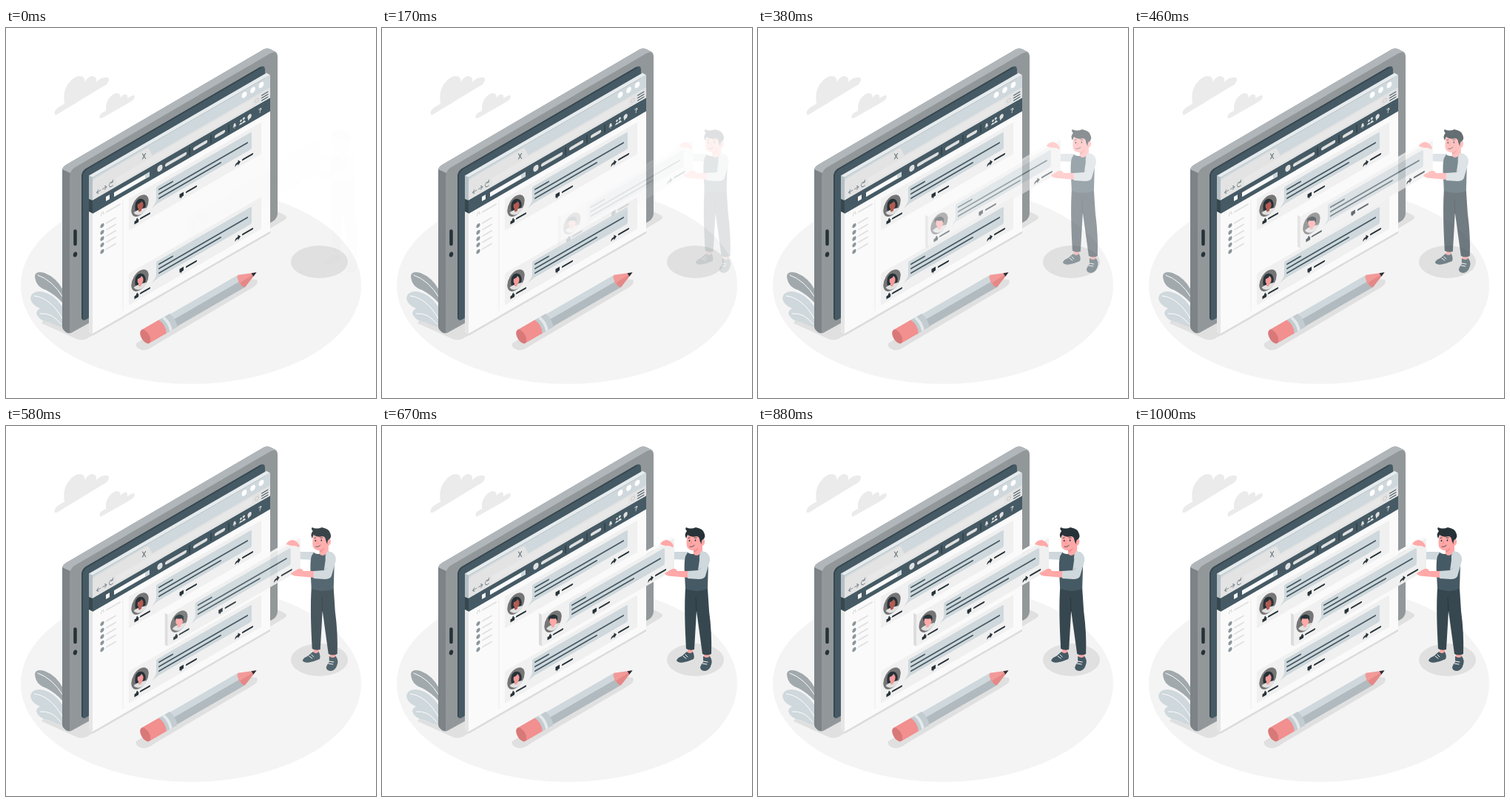
Write an HTML page that moves like this. It is 500 by 500 pixels and loops after 1040 ms.

```html
<!DOCTYPE html>
<html lang="en">
<head>
<meta charset="utf-8">
<title>Placing a post</title>
<style>
html, body { margin: 0; width: 100%; height: 100%; overflow: hidden; background: #fff; }
svg { display: block; width: 100%; height: 100%; }
.line { fill: none; stroke-linecap: round; stroke-linejoin: round; }
</style>
</head>
<body>
<svg viewBox="0 0 500 500">
  <defs>
    <!-- drawn flat, then skewed onto the screen plane -->
    <g id="post">
      <rect x="49" y="59" width="179" height="43" rx="1.500" fill="#f0f0f0"/>
      <path d="M88 64.500H213Q215 64.500 215 66.500V85.500Q215 87.500 213 87.500H88L80 90Q86 86 86 82V66.500Q86 64.500 88 64.500Z" fill="#cfd8dc"/>
      <path class="line" d="M90 70H108M90 76H209M90 82H173" stroke="#455a64" stroke-width="2"/>
      <path class="line" d="M65 95H77M127 95H140M203 95H216" stroke="#263238" stroke-width="2.200"/>
      <g fill="#263238">
        <path d="M56.500 94H58.500L60 91.500Q61.500 91.500 61 94H62.500L62 98H56.500Z"/>
        <path d="M117.500 92.500H123V97.500H121L119 99.500V97.500H117.500Z"/>
        <path d="M192.500 99Q192 94.500 196.500 94.500V92L200 96L196.500 99.500V97Q194 97 192.500 99Z"/>
      </g>
      <ellipse cx="64" cy="77" rx="11.700" ry="13.200" fill="#757575"/>
    </g>
    <!-- portraits, centred on their circle -->
    <g id="woman">
      <path d="M-6 8Q-8 -2 -4 -7Q0 -11 5 -8Q9 -4 7 3L5 8Z" fill="#263238"/>
      <path d="M-8.500 10Q-5 6 -1 6Q5 3 9 3Q8 8 2 11.500Q-4 14.500 -8.500 10Z" fill="#e0e0e0"/>
      <path d="M-3 -2Q1 -3 2 -6Q5 -4 4.500 0Q4 4 2 4.500V7Q0 9 -2 8V4Q-4 3 -3 -2Z" fill="currentColor"/>
    </g>
    <g id="guy">
      <path d="M-9 10Q-5 5 0 5Q6 2 9.500 2Q8 8 2 11.500Q-4 14.500 -9 10Z" fill="#e0e0e0"/>
      <path d="M-4.500 -3Q0 -6 4.500 -4L5.500 -1Q5 4 2 5V7Q0 9 -2 7.500V5Q-5 3 -4.500 -3Z" fill="#ffa8a7"/>
      <path d="M-5 0Q-8 -6 -3 -8Q2 -11 6 -7Q7 -4 5.500 0L4 -4Q0 -3 -4 -4Z" fill="#263238"/>
    </g>
  </defs>

  <!-- floor and clouds -->
  <ellipse cx="250" cy="348" rx="230" ry="133" fill="#f4f4f4"/>
  <ellipse cx="423.500" cy="316" rx="38.500" ry="22" fill="#e0e0e0"/>
  <g fill="#ebebeb">
    <path d="M66 117Q64 112 71 107Q77 104 79 102Q76 84 86 73Q95 62 104 66Q107 69 107 73Q111 64 118 65Q123 67 122 73Q128 67 133 67Q140 66 139 71Q138 76 131 79L72 115Q68 118 66 117Z"/>
    <path d="M127 122Q125 117 131 114L135 112Q134 99 142 92Q149 86 153 89Q155 91 155 94Q159 88 163 90Q165 92 164 95Q174 88 174 93Q173 97 168 100L131 121Q128 123 127 122Z"/>
  </g>
  <path d="M48 399Q50 393 62 391L76 384L358 244L377 253Q381 256 377 259L109 420Q102 423 95 420Z" fill="#e0e0e0"/>

  <!-- plant -->
  <path d="M39 335Q40 328 52 331Q68 337 77 354V372Q66 360 54 354Q40 350 39 335Z" fill="#a1a9ad"/>
  <path d="M33 365Q34 356 46 356Q64 358 77 378V404Q66 402 58 397Q44 396 41 385Q42 381 46 379Q34 374 33 365Z" fill="#cfd8dc"/>
  <path class="line" d="M43 334Q63 341 77 364M38 362Q60 364 77 394M46 386Q62 384 74 400" stroke="#fff" stroke-width="1"/>

  <!-- tablet -->
  <path d="M76 193Q76 188 81 185L348 29Q353 26 358 29L364 32Q367 34 367 39V250Q367 257 361 261L90 411Q85 414 81 411L79 409Q76 407 76 402Z" fill="#92979a"/>
  <path d="M76 191L87 196Q86 198 86 201V412Q83 412 81 411L79 409Q76 407 76 402Z" fill="#7d8386"/>
  <path d="M76 191Q77 187 81 185L348 29Q353 26 358 29L365 33Q361 32 356 35L92 189Q89 191 87 196Z" fill="#b0b6b9"/>
  <path d="M102 202Q102 194 108 190L343 53Q350 49 350 57V250L108 394Q102 397 102 390Z" fill="#455a64"/>
  <path class="line" d="M103 392V201Q103 195 108 191L344 53.500" stroke="#37474f" stroke-width="2"/>
  <path class="line" d="M93.500 274.500V292" stroke="#263238" stroke-width="4.500"/>
  <ellipse cx="93.500" cy="306" rx="2.600" ry="3.600" fill="#263238" transform="rotate(15 93.500 306)"/>

  <!-- browser -->
  <path d="M112 199L117 202V234L112 231.500Z" fill="#b5c0c5"/>
  <path d="M112 231L117 233V251L112 248.500Z" fill="#37474f"/>
  <path d="M112 248L117 250.500V414L112 411.500Z" fill="#e6e6e6"/>
  <g transform="translate(117 200) skewY(-30)">
    <path d="M0 213H240V216H0Z" fill="#dcdcdc"/>
    <path d="M0 2L-5 -3.500H235L240 2Z" fill="#e6ebed"/>
    <path d="M0 2H240V20H0Z" fill="#cfd8dc"/>
    <path d="M0 18.500H240V33H0Z" fill="#e3e3e3"/>
    <path d="M0 20V9Q0 5 4 5H72Q76 5 77 9L81 20Z" fill="#e3e3e3"/>
    <path d="M32 21H216V30H32Z" fill="#e8e8e8"/>
    <g fill="#fff">
      <ellipse cx="205" cy="8.700" rx="3.400" ry="3.800"/>
      <ellipse cx="216.500" cy="8.700" rx="3.400" ry="3.800"/>
      <ellipse cx="228" cy="8.700" rx="3.400" ry="3.800"/>
    </g>
    <path class="line" d="M228.500 23H237M228.500 26.500H237M228.500 30H237" stroke="#455a64" stroke-width="1.100"/>
    <path class="line" d="M11 25.500H5.500M8 23L5.500 25.500L8 28M13.500 25.500H19M16.500 23L19 25.500L16.500 28M27.500 23.500Q23 21 22.500 25.500Q23 30 27.500 28.500M27.500 21V24H25" stroke="#78868c" stroke-width=".9"/>
    <circle cx="222" cy="26" r="2.300" fill="none" stroke="#c4c4c4" stroke-width=".8"/>

    <path d="M0 33H240V51H0Z" fill="#455a64"/>
    <path d="M18 38.500H23V44.500H18ZM29 39H77V45H29Z" fill="#fafafa"/>
    <path d="M71 39H77V45H71Z" fill="#cfd8dc"/>
    <ellipse cx="91" cy="42" rx="3.600" ry="4.200" fill="#e0e0e0"/>
    <path class="line" d="M100 42.500H125M138 42.500H153M167 42.500H177" stroke="#e0e0e0" stroke-width="4.300"/>
    <path d="M131 37V48M160 37V48M184 37V48" stroke="#263238" stroke-width="1"/>
    <g fill="#e0e0e0">
      <path d="M189.500 44.500Q190.500 43 190.500 41Q192 38 193.300 41Q193.300 43 194.300 44.500ZM191 45.500H193L192 46.500Z"/>
      <circle cx="200.500" cy="41" r="1.400"/><circle cx="204.300" cy="40.300" r="1.600"/>
      <path d="M198 45.500Q200 41.500 202 45Q204.500 40.500 207 46H198Z"/>
      <path d="M212 39Q214.800 39 214.800 42.300Q214.800 45.300 212 45.300L210 46.500V44.500Q208.500 42 210 39.800Z"/>
      <text x="226.500" y="45.500" font-family="Inter, sans-serif" font-size="8.500" font-weight="700" text-anchor="middle">?</text>
    </g>

    <path d="M0 51H240V213H0Z" fill="#fafafa"/>
    <path d="M41 57V206" stroke="#ebebeb" stroke-width="1"/>
    <path class="line" d="M11.500 60.500Q11.500 56.500 13.500 56.500Q15 56.500 15 60.500" stroke="#d5d5d5" stroke-width="1"/>
    <path class="line" d="M19 59.500H37M19 74.500H31M19 83.500H31M19 92H31M19 100.500H31M19 109.500H31" stroke="#e0e0e0" stroke-width="2"/>
    <path class="line" d="M13 74.300V74.700M13 83.300V83.700M13 91.800V92.200M13 100.300V100.700M13 109.300V109.700" stroke="#8d979c" stroke-width="5.200"/>
    <use href="#post"/>
    <use href="#post" y="101"/>
  </g>
  <path class="line" d="M184.500 170L188.500 176.500M188.500 169.500L184.500 177" stroke="#455a64" stroke-width="1"/>
  <use href="#woman" x="181" y="240" color="#b55b52"/>
  <use href="#woman" x="181" y="341" color="#f59a99"/>

  <!-- pencil -->
  <path d="M176 426Q174 432 183 435Q190 437 199 430L333 351Q342 346 339 340L320 338Z" fill="#e0e0e0"/>
  <g transform="translate(190 416) rotate(-30)">
    <path d="M40 -9.500H148L145 -1H40Z" fill="#cfd8dc"/>
    <path d="M40 -1H146L148 9.500H40Z" fill="#b0babf"/>
    <path d="M148 -9.500L171.500 0L148 9.500Q143 5 146 3Q142 0 145 -3Q144 -7 148 -9.500Z" fill="#f29a99"/>
    <path d="M146 1L171.500 0L148 9.500Q143 5 146 1Z" fill="#e58886"/>
    <path d="M165 -2.700L171.500 0L165 2.700Z" fill="#263238"/>
    <path d="M25 -10.500H42Q46 0 42 10.500H25Z" fill="#c3ccd0"/>
    <path d="M30 -10.500Q34 0 30 10.500H34Q38 0 34 -10.500Z" fill="#e4eaec"/>
    <path d="M-2 -10.500H25Q30 0 25 10.500H-2Z" fill="#f28f8f"/>
    <ellipse cx="-2" cy="0" rx="5.500" ry="10.500" fill="#d97878"/>
  </g>

  <!-- person carrying the post -->
  <g id="carrier">
    <path d="M414 170H394Q388 174 393 180L414 181Z" fill="#cfd8dc"/>
    <g transform="translate(117 200) skewY(-30) translate(50 52.900)">
      <path d="M49 59L45 54.400V97.400L49 102Z" fill="#dcdcdc"/>
      <path d="M49 59L45 54.400H224L228 59Z" fill="#fafafa"/>
      <use href="#post"/>
    </g>
    <use href="#guy" x="231" y="264"/>
    <path d="M393 164Q388 161 384 162L376 160Q378 154.500 385 154Q391 155 394 162Z" fill="#ffa8a7"/>

    <path d="M413 298H420V310H413ZM435 304H443V316H435Z" fill="#ffa8a7"/>
    <path d="M412 305Q416 309 420 305Q423 311 421 315Q414 318 409 319Q401 321 398 317Q399 313 405 311ZM434 311Q439 315 443 311Q447 317 445 322Q443 330 437 331Q430 331 430 326Q431 322 434 319Z" fill="#455a64"/>
    <path class="line" d="M407 311L411 314M410 309L413 312M434 318L440 319M433 321L439 322" stroke="#fff" stroke-width="1"/>
    <path d="M410 219Q425 225 440 219L442 250Q446 280 445 308Q439 311 433 308L425 250L422 302Q416 304 411 301Q408 250 410 219Z" fill="#37474f"/>
    <path class="line" d="M425 250L424 232" stroke="#263238" stroke-width=".8"/>
    <path d="M413 171Q420 176 430 169L438 171L441 186L440 220Q426 226 410 220L409 200Q408 184 410 176Z" fill="#455a64"/>

    <path d="M413 147Q410 160 413 165Q417 169 421 168V173Q426 178 433 170V162Q437 160 436 154Q434 151 432 154L430 146Z" fill="#ffa8a7"/>
    <path d="M421 168Q425 167 428 164Q426 170 421 171Z" fill="#f28f8f"/>
    <path d="M411 152Q408 146 412 142Q409 139 411 137Q417 140 424 137Q434 139 435 144Q438 149 434.500 153Q431.500 153 431.500 160L429.500 155Q429 149 425 149Q418 151 413 147Z" fill="#263238"/>
    <path class="line" d="M415.500 154.500V155.500M423.500 154V155" stroke="#263238" stroke-width="1.600"/>
    <path class="line" d="M414 151.500L416 151M422 151L425 151M416 163Q420 164 422 161" stroke="#263238" stroke-width=".8"/>
    <path class="line" d="M418.500 155L417.500 159H419" stroke="#f28f8f" stroke-width=".8"/>

    <path d="M414 196L399 196Q396 190 389 195L382 199Q384 203 392 203L414 205Z" fill="#ffa8a7"/>
    <path d="M432 169Q444 171 443 182L437 203Q435 207 428 207L413 206V196L427 195L429 181Q428 173 432 169Z" fill="#cfd8dc"/>
    <path class="line" d="M427 195L431 192" stroke="#a9b4b9" stroke-width=".8"/>
  </g>
</svg>
<script>
const LOOP = 1040, STEPS = 25, SLIDE = 30;
const carrier = document.getElementById("carrier");

const bezier = (a, b, s) => 3 * (1 - s) * s * ((1 - s) * a + s * b) + s ** 3;

// cubic-bezier(.36, -.01, .5, 1.38): settles after a small overshoot
function ease(t) {
  let lo = 0, hi = 1;
  for (let i = 0; i < 24; i++) {
    const mid = (lo + hi) / 2;
    if (bezier(.36, .5, mid) < t) lo = mid; else hi = mid;
  }
  return bezier(-.01, 1.38, hi);
}

function draw(now) {
  // 5 ms lead: steps fall on whole hundredths of a second
  const step = Math.floor((now % LOOP + 5) / LOOP * STEPS) + 1;
  const p = ease(Math.min(1, step / STEPS));
  carrier.setAttribute("transform", `translate(${SLIDE * (1 - p)})`);
  carrier.setAttribute("opacity", Math.min(1, Math.max(0, p)));
  requestAnimationFrame(draw);
}
draw(0);
</script>
</body>
</html>
```
